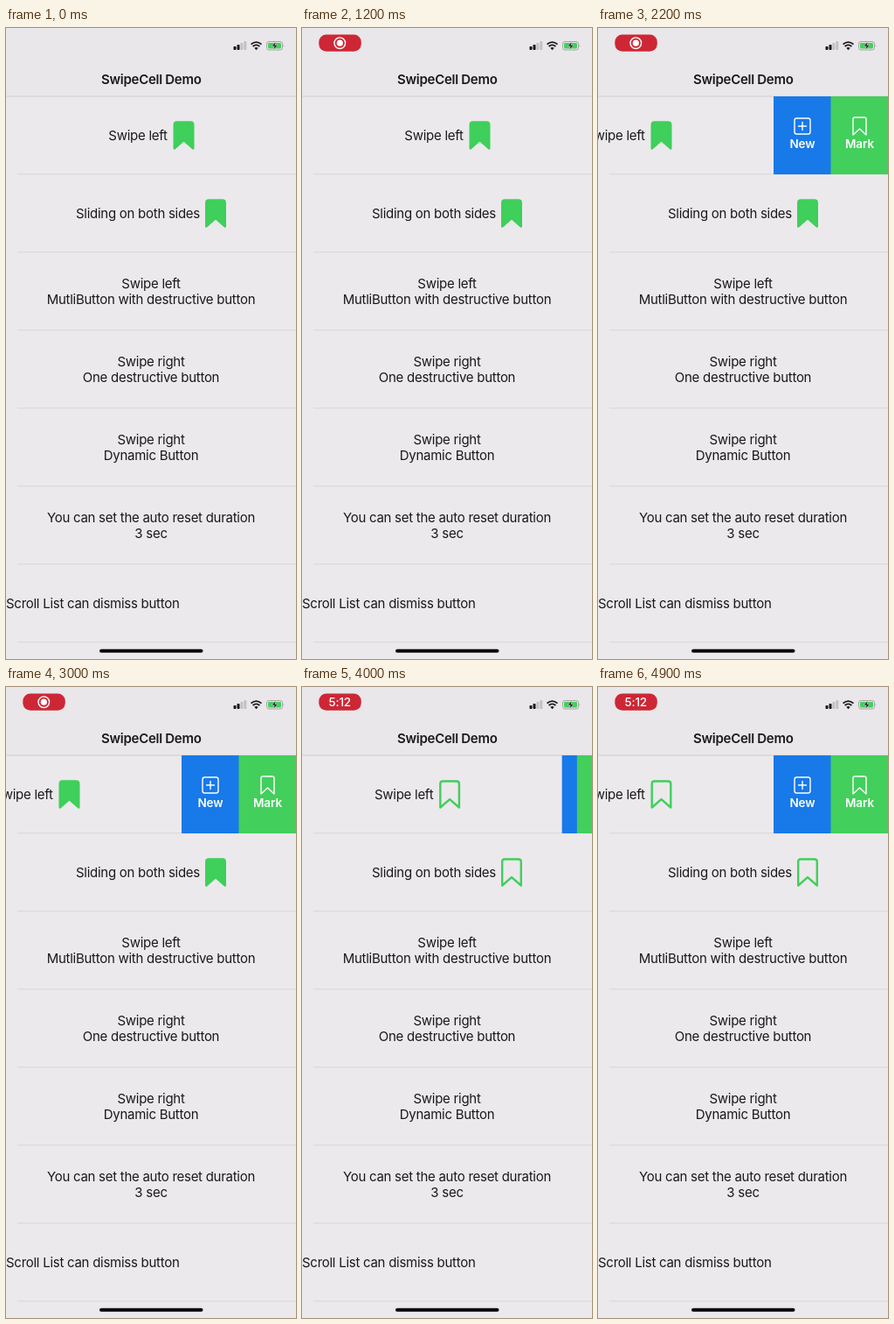
These frames come from a looping animation (332 by 720 pixels, 5 s). An HTML page:

```html
<!DOCTYPE html>
<html lang="en">
<head>
<meta charset="utf-8">
<style>
html, body { margin: 0; width: 100%; height: 100%; overflow: hidden; background: #ebe9ec; }
svg { display: block; width: 332px; height: 720px; }
text { font: 15px Inter, Roboto, sans-serif; letter-spacing: -.27px; fill: #19191b; text-anchor: middle; }
.title { font-weight: 600; letter-spacing: -.28px; }
.label { font-size: 13.5px; font-weight: 600; letter-spacing: -.1px; fill: #fff; }
.clock { font-size: 13.5px; font-weight: 500; letter-spacing: -.2px; fill: #fff; }
.icon { fill: none; stroke: #fff; stroke-width: 1.4; stroke-linejoin: round; stroke-linecap: round; }
.mark { stroke: #3fcf5b; stroke-width: 2.4; stroke-linejoin: round; }
</style>
</head>
<body>
<svg viewBox="0 0 332 720">
  <defs>
    <path id="ribbon" d="M1.2 31.2V4.2q0-3 3-3h15.6q3 0 3 3v27L12 21.8Z"/>
    <clipPath id="row"><rect y="78" width="332" height="89"/></clipPath>
  </defs>
  <rect width="332" height="720" fill="#ebe9ec"/>
  <rect width="332" height="78" fill="#e9e7e9"/>
  <path d="M0 78H332" stroke="#cfcdd0"/>
  <g id="lines" stroke="#d8d6d9"></g>
  <text class="title" x="166.3" y="64">SwipeCell Demo</text>

  <g clip-path="url(#row)">
    <g id="cell">
      <text x="151" y="128">Swipe left</text>
      <use class="mark" href="#ribbon" x="191.5" y="106.3"/>
    </g>
    <g id="new">
      <rect y="78" width="140" height="89" fill="#1879e9"/>
      <g class="icon">
        <rect x="24" y="103" width="18" height="18" rx="2.5"/>
        <path d="M28.5 112h9M33 107.5v9"/>
      </g>
      <text class="label" x="33" y="137">New</text>
    </g>
    <g id="tag">
      <rect y="78" width="140" height="89" fill="#43cf5c"/>
      <path class="icon" d="M25.5 122V104q0-2 2-2h11q2 0 2 2v18L33 115Z"/>
      <text class="label" x="33" y="137">Mark</text>
    </g>
  </g>

  <text x="151" y="217">Sliding on both sides</text>
  <use class="mark" href="#ribbon" x="228" y="195.3"/>
  <g id="rows"></g>
  <text x="0" y="662" style="text-anchor:start">Scroll List can dismiss button</text>
  <rect x="107" y="708.8" width="118.5" height="4" rx="2" fill="#08080a"/>

  <g id="pill">
    <rect x="19.3" y="7.6" width="48.5" height="19.2" rx="8.5" fill="#cd2736"/>
    <g id="rec">
      <circle class="icon" cx="43.3" cy="17.2" r="6.3"/>
      <circle cx="43.3" cy="17.2" r="3.6" fill="#fff"/>
    </g>
    <text id="clock" class="clock" x="43.3" y="22">5:12</text>
  </g>

  <g fill="#18181a">
    <rect x="260.5" y="21" width="3" height="4" rx=".7"/>
    <rect x="264.5" y="19" width="3" height="6" rx=".7"/>
    <g fill="#c3c1c4">
      <rect x="268.4" y="17" width="3" height="8" rx=".7"/>
      <rect x="272.3" y="15" width="3" height="10" rx=".7"/>
    </g>
    <path d="M286.5 25.2l-2.2-2.4q2.2-1.7 4.4 0Z"/>
    <path d="M282.6 21q3.9-3.2 7.8 0M280.5 18.6q6-5 12 0" fill="none" stroke="#18181a" stroke-width="1.8"/>
    <rect x="298.5" y="15.5" width="18" height="9.5" rx="2.6" fill="none" stroke="#a3a2a5"/>
    <rect x="300" y="17" width="15" height="6.5" rx="1.4" fill="#43cf5c"/>
    <path d="M317.6 18.6q1.6 1.6 0 3.3Z" fill="#a3a2a5"/>
    <path d="M308.8 15.6l-4.6 5.2h3l-1 4.2 4.8-5.4h-3Z" stroke="#ebe9ec" stroke-width=".5"/>
  </g>
</svg>
<script>
const $ = id => document.getElementById(id);
const OPEN = 131;

$("lines").innerHTML = [...Array(7)].map((_, i) => `<path d="M13 ${166.8 + 89 * i}H332"/>`).join("");
$("rows").innerHTML = [
  ["Swipe left", "MutliButton with destructive button"],
  ["Swipe right", "One destructive button"],
  ["Swipe right", "Dynamic Button"],
  ["You can set the auto reset duration", "3 sec"]
].map((pair, i) => pair.map((s, j) =>
  `<text x="166" y="${297.3 + 89 * i + 18 * j}">${s}</text>`).join("")).join("");

const ramp = (t, start, length) => Math.min(1, Math.max(0, (t - start) / length));
const smooth = u => u * u * (3 - 2 * u);
const inOut = u => u < .5 ? 4 * u ** 3 : 1 - 4 * (1 - u) ** 3;
const drag = (t, start) => smooth(ramp(t, start, 706));
const slide = (id, x) => $(id).setAttribute("transform", `translate(${x} 0)`);

function draw(t) {
  const shift = OPEN * (drag(t, 1380) - inOut(ramp(t, 3100, 515)) + drag(t, 3763));
  slide("cell", -shift);
  slide("new", 332 - shift);
  slide("tag", 332 - shift / 2);

  const fill = t < 3200 ? "#3fcf5b" : "none";
  document.querySelectorAll(".mark").forEach(m => m.style.fill = fill);

  const swap = ramp(t, 3000, 300);
  $("pill").style.opacity = ramp(t, 100, 400);
  $("rec").style.opacity = 1 - swap;
  $("clock").style.opacity = swap;
}

// The picture advances ten times a second.
function tick() {
  draw(Math.floor(performance.now() % 5000 / 100) * 100);
  requestAnimationFrame(tick);
}
tick();
</script>
</body>
</html>
```
